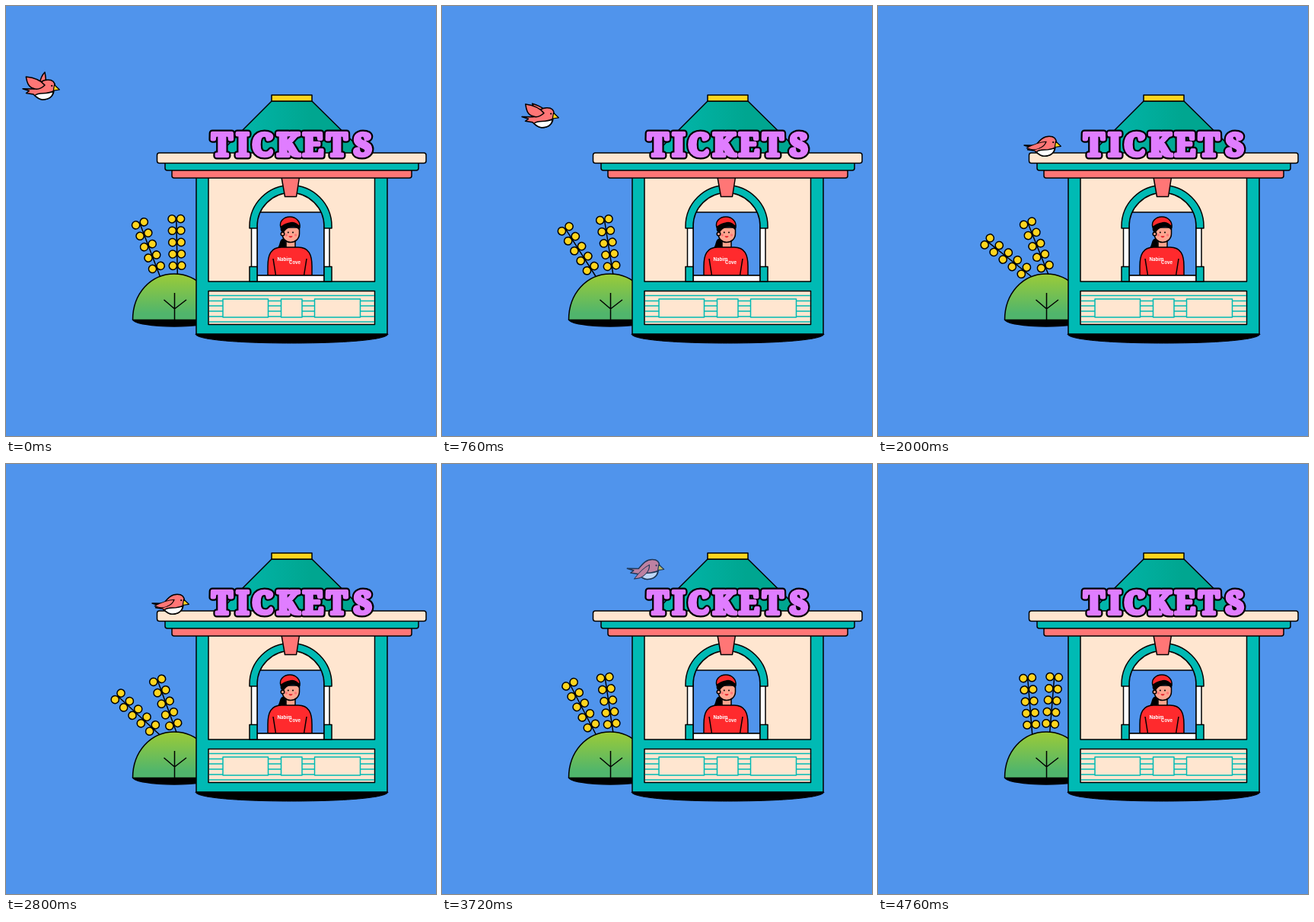
An HTML page with a canvas that plays this animation: 565x565 px, repeating every 4800 ms.

```html
<!DOCTYPE html>
<html lang="en">
<head>
<meta charset="utf-8">
<title>Ticket booth</title>
<style>
  html, body { margin: 0; width: 100%; height: 100%; overflow: hidden; background: #5094ec; }
  canvas { display: block; width: 100vw; height: 100vh; }
</style>
</head>
<body>
<canvas id="stage" width="565" height="565"></canvas>
<script>
const SIZE = 565, LOOP = 4800, STEP = 40;
const SKY = '#5094ec', TEAL = '#00bab4', CREAM = '#ffe6d0', PINK = '#ff7676',
      YELLOW = '#ffd51e', RED = '#ff2a2d', SKIN = '#ffa58f', LILAC = '#e07dff';

const stage = document.getElementById('stage').getContext('2d');
const layer = () => {
  const canvas = document.createElement('canvas');
  canvas.width = canvas.height = SIZE;
  return canvas.getContext('2d');
};
let g = stage;

function paint(path, fill, stroke = '#000', width = 1.5) {
  const shape = typeof path === 'string' ? new Path2D(path) : path;
  if (fill) { g.fillStyle = fill; g.fill(shape); }
  if (stroke) { g.strokeStyle = stroke; g.lineWidth = width; g.stroke(shape); }
}

function box(x1, y1, x2, y2, fill, stroke, radius = 0) {
  const p = new Path2D();
  p.roundRect(x1, y1, x2 - x1, y2 - y1, radius);
  paint(p, fill, stroke);
}

function dot(x, y, r, fill, stroke = null) {
  const p = new Path2D();
  p.arc(x, y, r, 0, Math.PI * 2);
  paint(p, fill, stroke);
}

function gradient(x1, y1, x2, y2, from, to) {
  const fill = g.createLinearGradient(x1, y1, x2, y2);
  fill.addColorStop(0, from);
  fill.addColorStop(1, to);
  return fill;
}

// Piecewise linear value over [time, value] keys.
function track(t, keys) {
  if (t <= keys[0][0]) return keys[0][1];
  for (let i = 1; i < keys.length; i++) {
    const [t0, a] = keys[i - 1], [t1, b] = keys[i];
    if (t < t1) return a + (b - a) * (t - t0) / (t1 - t0);
  }
  return keys[keys.length - 1][1];
}

function drawBush() {
  paint('M167 412C168 417 192 421 221 421S275 417 276 412Z', '#000');
  paint('M166.5 412.5C166.5 378 190 352 221 352S276 378 276 412.5Z',
    gradient(0, 352, 0, 404, '#9ccb37', '#50b56c'));
  paint('M221.5 377V413M207.5 386L221.5 398L237 386', null);
}

function drawRoof() {
  paint('M349 125H402L472 194H280Z', gradient(300, 0, 400, 0, '#02b6ab', '#00a690'));
  box(349, 117, 402, 125, YELLOW);
  box(218, 214, 533, 226, PINK, '#000', 3);
  box(209, 204, 542, 216, TEAL, '#000', 3);
  box(198.5, 193, 552, 206.5, CREAM, '#000', 3);
}

function drawSign() {
  const centers = [284, 311, 337, 371, 403.5, 435, 469];
  g.font = 'bold 41px "Noto Serif", serif';
  g.textAlign = 'center';
  const letters = draw => [...'TICKETS'].forEach((c, i) => draw(c, centers[i], 196.6));
  g.strokeStyle = '#000';
  g.lineWidth = 9;
  letters((c, x, y) => g.strokeText(c, x, y));
  g.strokeStyle = g.fillStyle = LILAC;
  g.lineWidth = 4.6;
  letters((c, x, y) => { g.strokeText(c, x, y); g.fillText(c, x, y); });
}

function drawClerk() {
  paint('M365 305C358 307 361 314 356 319C362 323 369 320 368 311Z', '#000', null);
  paint('M368 305V316C368 321 380 321 380 316V305Z', SKIN);
  paint('M363 291V299C363 306 368 310.5 374 310.5S385.5 306 385.5 299V291Z', SKIN);
  dot(363.5, 299.5, 2.3, SKIN, '#000');
  paint('M361 291C362 286 367 284 374 284C381 284 386 287 386 297C385 293 382 291 378 290C373 290 367 293 365 298C361 297 360 294 361 291Z', '#000', null);
  paint('M361 291C358.5 283 365 277 373 277S387 283 386 291C382 285 377 284 373 285C368 286 364 288 361 291Z', RED);
  dot(370.8, 297.5, 1, '#000');
  dot(377, 297.5, 1, '#000');
  dot(368.3, 301, 1.7, PINK);
  dot(380.5, 301, 1.7, PINK);
  paint('M371.5 302.2H376.5C376 305 372 305 371.5 302.2Z', '#e5202b', null);
  paint('M344 354V342C344 327 348 317 362 317H384C398 317 402 327 402 342V354Z', RED);
  paint('M354.5 354L351 332M391.5 354L395 332', null);
  g.fillStyle = '#fff';
  g.textAlign = 'left';
  g.font = 'bold 6px Inter, sans-serif';
  g.fillText('Nabim', 356.5, 334.8);
  g.fillText('Cove', 372, 338.6);
}

function drawWindow() {
  paint('M330 292V289.5A44 44 0 0 1 418 289.5V292Z', CREAM, null);
  box(330, 271, 418, 354, SKY);
  drawClerk();
  box(330, 354, 418, 362, '#fff');
  box(322.5, 290, 330, 345, '#fff');
  box(418, 290, 425, 345, '#fff');
  box(320, 342.5, 330, 362, TEAL);
  box(418, 342.5, 428, 362, TEAL);
  paint('M320 292V289.5A54 54 0 0 1 428 289.5V292H418V289.5A44 44 0 0 0 330 289.5V292Z', TEAL);
  paint('M362 225H385.5L381.5 250.5H366.5Z', PINK);
}

function drawBooth() {
  paint('M249 431C250 438 300 443 375.5 443S501 438 502 431Z', '#000', '#000', 1);
  box(250, 222, 501, 431, TEAL);
  box(266, 222, 484.5, 362, CREAM);
  box(266, 374.5, 484.5, 418.5, CREAM);
  [380.5, 387.5, 394, 401, 408, 415].forEach(y => paint(`M267 ${y}H484`, null, TEAL));
  [[285, 344.5], [361.5, 389], [405.5, 465.5]].forEach(([a, b]) => box(a, 385, b, 409, CREAM, TEAL));
  drawWindow();
  drawRoof();
  drawSign();
}

function drawBranch(x, y, lean, firstPair) {
  g.save();
  g.translate(x, y);
  g.rotate(-lean * Math.PI / 180);
  paint(`M0 0V${-firstPair - 62}`, null);
  for (let i = 0; i < 5; i++) {
    for (const side of [-5.7, 5.7]) dot(side, -firstPair - i * 15.4, 5.1, YELLOW, '#000');
  }
  g.restore();
}

function drawWing(x, y, degrees, thickness, path) {
  g.save();
  g.translate(x, y);
  g.rotate(degrees * Math.PI / 180);
  g.scale(1, thickness);
  const shape = new Path2D();
  shape.addPath(new Path2D(path));
  paint(shape, PINK);
  g.restore();
}

function drawBird(t) {
  const x = track(t, [[0, 0], [1557, 170], [3150, 170], [4660, 306]]);
  const y = track(t, [[0, 0], [1535, 74.3], [3150, 74.3], [4660, -47]]);
  const wing = track(t, [[0, 24], [760, 26], [1120, -10], [1400, -18], [3150, -18], [3720, -43]]);
  const thickness = track(t, [[760, 1], [1400, 0.55]]);
  const farWing = track(t, [[0, 0], [760, -62], [1120, -112]]);

  g.save();
  g.translate(x, y);
  if (t < 1120) drawWing(47, 102, farWing, 1, 'M-3 1C-2 -6 0 -11 4 -15C5 -10 6 -5 5 1Z');
  paint('M22 108.8L37 109C43 102 47 97 55 97C61 97 64.5 100 64.5 106L63 111C62.5 119 56 123 48 123C42 122.5 39 119 36 116L26.5 114.5L30.5 111.5Z', PINK);
  paint('M38 117.5C44 112.5 52 117 62 112C62 119 56 123 48 123C43 122.5 40.5 120 38 117.5Z', '#fff');
  paint('M63.5 103.5L70.3 110L62.3 111.2Z', YELLOW, '#000', 1.2);
  dot(60.2, 104.8, 1.1, '#000');
  drawWing(51, 104, wing, thickness, 'M0 0C-8 -4 -18 -3 -27 0C-23 6 -19 11 -12 10C-6 10 -2 5 0 0Z');
  g.restore();
}

function onLayer(draw) {
  g = layer();
  g.lineJoin = 'round';
  draw();
  const { canvas } = g;
  g = stage;
  return canvas;
}

const scenery = onLayer(() => { drawBush(); drawBooth(); });
const birdLayer = layer();
stage.lineJoin = birdLayer.lineJoin = 'round';

function render(t) {
  stage.fillStyle = SKY;
  stage.fillRect(0, 0, SIZE, SIZE);
  drawBranch(225.4, 356.5, track(t, [[0, 1.2], [2360, 25.5], [LOOP, -5.2]]), 15.2);
  drawBranch(202.8, 356.5, track(t, [[0, 20.8], [2360, 57], [LOOP, 3.8]]), 14);
  stage.drawImage(scenery, 0, 0);

  g = birdLayer;
  g.clearRect(0, 0, SIZE, SIZE);
  drawBird(t);
  g = stage;
  stage.globalAlpha = track(t, [[3150, 1], [4660, 0]]);
  stage.drawImage(birdLayer.canvas, 0, 0);
  stage.globalAlpha = 1;
}

function tick(now) {
  render(Math.floor((now % LOOP) / STEP) * STEP);
  requestAnimationFrame(tick);
}
render(0);
requestAnimationFrame(tick);
</script>
</body>
</html>
```
